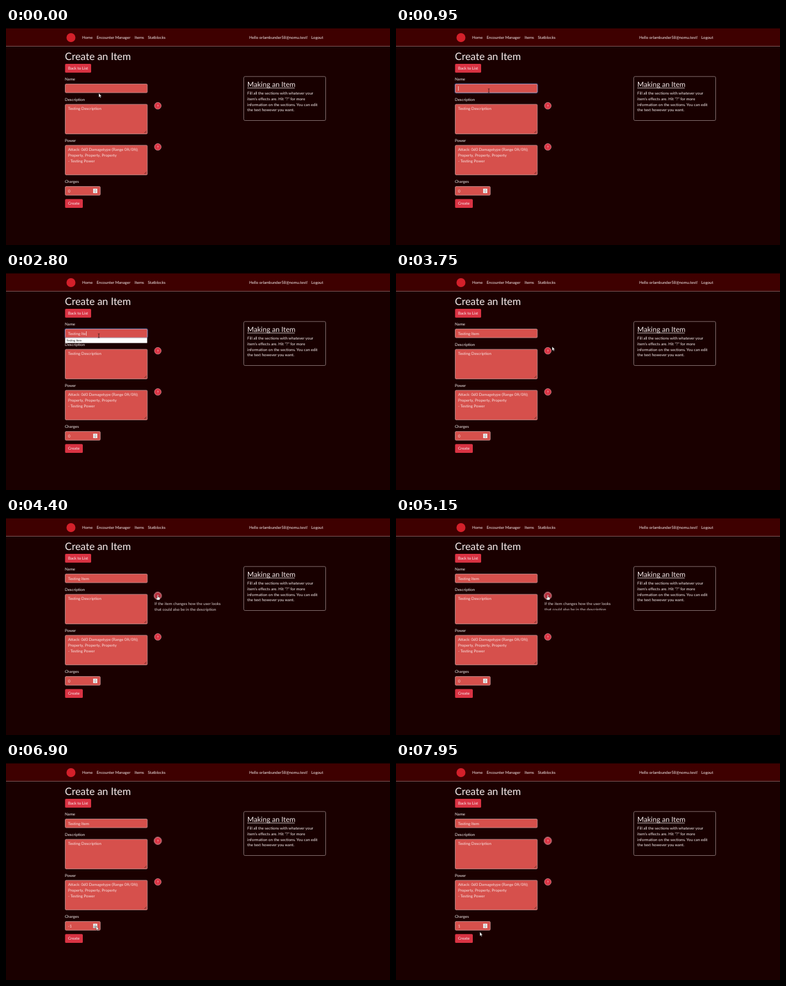
These frames come from a looping animation (600 px wide and 339 px high, 8000 ms). An HTML page:

```html
<!DOCTYPE html>
<html lang="en">
<head>
<meta charset="utf-8">
<title>Create an Item</title>
<style>
  html, body { margin: 0; width: 100%; height: 100%; overflow: hidden; background: #1a0000; }
  svg { display: block; width: 100vw; height: 100vh; }
  text { font: 6.15px Lato, sans-serif; fill: #f6eeee; text-rendering: geometricPrecision; white-space: pre; }
  .h1 { font-size: 16px; }
  .h2 { font-size: 11.1px; }
  .input { fill: #d6504c; stroke: #cda3a4; stroke-width: .7; }
  .value { fill: #f8e2e0; }
  .btn { fill: #da3343; }
  .grip { stroke: #4f2a2a; stroke-width: .7; }
  .help circle { fill: #da3343; stroke: #e3a3a8; stroke-width: .7; }
  .help text { font-size: 5.5px; text-anchor: middle; }
  #popup text { font-size: 4.45px; fill: #1a1a1a; }

  #pointer { animation: move 8s infinite ease-in-out; }
  #nameRing, #helpRing, #helpDot, #drawer { animation-duration: 8s; animation-iteration-count: infinite; }
  @keyframes move {
    0%, .6% { transform: translate(145px, 102px); }
    7.5%, 41.25% { transform: translate(145px, 98px); }
    46.875% { transform: translate(244px, 115px); }
    49.4%, 67.5% { transform: translate(237px, 121px); }
    73.1% { transform: translate(141px, 253px); }
    76.9%, 80% { transform: translate(139px, 250px); }
    82.5%, 88.1% { transform: translate(141px, 255px); }
    90.6%, 96.2% { transform: translate(139.5px, 250px); }
    99.4%, 100% { transform: translate(131px, 264px); }
  }
  #nameRing { animation-name: nameFocus; }
  @keyframes nameFocus {
    0%, 8.7% { opacity: 0; }
    10.6%, 41.25% { opacity: 1; }
    43.1%, 100% { opacity: 0; }
  }
  #helpRing { animation-name: helpFocus; }
  @keyframes helpFocus {
    0%, 51.2% { opacity: 0; }
    53%, 100% { opacity: 1; }
  }
  #helpDot { animation-name: helpHover; }
  @keyframes helpHover {
    0%, 48.1% { fill: #da3343; }
    50%, 67.7% { fill: #b82d3a; }
    69.5%, 100% { fill: #da3343; }
  }
  #drawer { animation-name: drawer; animation-timing-function: ease; }
  @keyframes drawer {
    0%, 51.875% { height: 0; }
    56.25%, 63.375% { height: 24px; }
    67.75%, 100% { height: 0; }
  }
</style>
</head>
<body>
<svg viewBox="0 0 600 339" preserveAspectRatio="none">
  <defs>
    <clipPath id="drawerClip"><rect id="drawer" x="230" y="129" width="125" height="0"/></clipPath>
    <g id="grip" class="grip"><path d="M-4.5 -1L-1 -4.5M-2.6 -1L-1 -2.6"/></g>
  </defs>

  <rect width="600" height="339" fill="#1a0000"/>
  <rect width="600" height="28.5" fill="#3e0000"/>
  <rect width="600" height="1" fill="#150000"/>
  <rect y="28" width="600" height="1" fill="#775252"/>
  <circle cx="101.5" cy="15" r="7" fill="#d3202a"/>
  <text x="119" y="17.3">Home</text>
  <text x="141.5" y="17.3">Encounter Manager</text>
  <text x="201" y="17.3">Items</text>
  <text x="221.5" y="17.3">Statblocks</text>
  <text x="380" y="17.3">Hello orlambunder58@nomu.test!</text>
  <text x="477" y="17.3">Logout</text>

  <text class="h1" x="92" y="49.6">Create an Item</text>
  <rect class="btn" x="92.3" y="56" width="40.7" height="13.8" rx="1.5"/>
  <text x="97" y="65.2">Back to List</text>

  <text x="92" y="82.2">Name</text>
  <text x="92" y="114">Description</text>
  <text x="92" y="178.2">Power</text>
  <text x="92" y="242.2">Charges</text>

  <rect class="input" x="92.5" y="87.5" width="128.3" height="13.6" rx="1.5"/>
  <g id="nameRing" fill="none">
    <rect x="91.5" y="86.5" width="130.3" height="15.6" rx="2.3" stroke="#0d6efd" stroke-opacity=".15" stroke-width="1.4"/>
    <rect x="92.5" y="87.5" width="128.3" height="13.6" rx="1.5" stroke="#a596bd" stroke-width=".7"/>
  </g>
  <text class="value" id="name" x="97" y="96.6"></text>
  <rect id="caret" y="91" width=".6" height="7" fill="#fff"/>

  <rect class="input" x="92.5" y="119.2" width="128.3" height="46.2" rx="1.5"/>
  <text class="value" x="97" y="128.4">Testing Description</text>
  <use href="#grip" x="220.5" y="165"/>

  <rect class="input" x="92.5" y="183.2" width="128.3" height="46.2" rx="1.5"/>
  <text class="value" x="97" y="192.4">Attack: 0d0 Damagetype (Range 0ft/0ft);</text>
  <text class="value" x="97" y="201.2">Property, Property, Property</text>
  <text class="value" x="97" y="210.1">- Testing Power</text>
  <use href="#grip" x="220.5" y="229"/>

  <rect class="input" x="92.5" y="247.6" width="54.8" height="13.6" rx="1.5"/>
  <text class="value" id="charges" x="97" y="256.6">0</text>
  <rect x="136.2" y="251" width="6.4" height="7" fill="#efefef"/>
  <rect id="spinHot" x="136.2" width="6.4" height="3.5" fill="#c4c4c4"/>
  <path d="M138.2 253.6l1.2-1.4 1.2 1.4zM138.2 255.6l1.2 1.4 1.2-1.4z" fill="#666"/>

  <rect class="btn" x="92.3" y="267.2" width="27.7" height="13.8" rx="1.5"/>
  <text x="97" y="276.3">Create</text>

  <g class="help">
    <circle id="helpRing" cx="237.2" cy="121.5" r="6" style="fill:none;stroke:#b8646b;stroke-width:.9"/>
    <circle id="helpDot" cx="237.2" cy="121.5" r="5.2"/>
    <text x="237.2" y="123.5">?</text>
    <circle cx="237.2" cy="185.8" r="5.2"/>
    <text x="237.2" y="187.8">?</text>
  </g>
  <g clip-path="url(#drawerClip)" opacity=".88">
    <text x="232" y="136.2">If the item changes how the user looks</text>
    <text x="232" y="145.1">that could also be in the description</text>
  </g>

  <rect x="371.5" y="75.8" width="128" height="68.7" rx="2" fill="#180000" stroke="#a89696" stroke-width=".7"/>
  <text class="h2" x="377" y="92">Making an Item</text>
  <rect x="377" y="93.5" width="74.2" height=".7" fill="#fff"/>
  <text x="377" y="103.8">Fill all the sections with whatever your</text>
  <text x="377" y="112.7">item's effects are. Hit "?" for more</text>
  <text x="377" y="121.5">information on the sections. You can edit</text>
  <text x="377" y="130.3">the text however you want.</text>

  <g id="popup">
    <rect id="sheet" x="92.5" y="101.4" width="128" fill="#fff" stroke="#b9b9b9" stroke-width=".4"/>
  </g>

  <g id="pointer">
    <path id="arrow" d="M0 0V6.2L1.4 4.9 2.4 7.1 3.4 6.7 2.4 4.5H4.3Z" fill="#fff" stroke="#222" stroke-width=".4"/>
    <path id="beam" d="M-1.3 -3.2Q0 -3.2 0 -2.4Q0 -3.2 1.3 -3.2M0 -2.4V2.4M-1.3 3.2Q0 3.2 0 2.4Q0 3.2 1.3 3.2" fill="none" stroke="#241010" stroke-width=".7"/>
    <path id="hand" d="M-.7 .3Q0 -.6 .7 .3V2.6L3 3.1Q3.7 3.3 3.6 4.2L3 7H-.9L-2.6 4.4Q-2.3 3.4 -.7 4.4Z" fill="#fff" stroke="#222" stroke-width=".4"/>
  </g>
</svg>
<script>
const LOOP = 8000, ROW = 7.4;
const $ = id => document.getElementById(id);
const NAME = 'Testing Item';
const keyTimes = [1250, 1450, 1650, 1800, 1950, 2050, 2250, 2450, 2650, 2700, 2800, 2900];
const charges = [[0, '0'], [6300, '1'], [6700, '0'], [6900, '-1'], [7300, '0'], [7500, '1']];
const shapes = [[0, 'arrow'], [200, 'beam'], [3350, 'arrow'], [3850, 'hand'],
  [5500, 'arrow'], [5600, 'beam'], [5700, 'arrow']];
const hotHalf = [[0, 0], [5850, 251], [6500, 254.5], [7150, 251], [7800, 0]];
const suggestions = ['Testing Item', 'Ring of Testing', 'Test', 'Testing', 'Testing Ring'];

const rows = suggestions.map(label => {
  const row = document.createElementNS('http://www.w3.org/2000/svg', 'text');
  row.textContent = label;
  row.setAttribute('x', 94.5);
  return $('popup').appendChild(row);
});

const latest = (list, t) => list.filter(([start]) => start <= t).pop()[1];
const show = (el, on) => { el.style.display = on ? '' : 'none'; };
const matches = (label, typed) =>
  (' ' + label).toLowerCase().includes(' ' + typed.trim().toLowerCase());

function drawPopup(typed) {
  const open = typed && typed !== NAME;
  show($('popup'), open);
  if (!open) return;
  let n = 0;
  rows.forEach(row => {
    const hit = matches(row.textContent, typed);
    show(row, hit);
    if (hit) row.setAttribute('y', 107.1 + ROW * n++);
  });
  $('sheet').setAttribute('height', ROW * n + .4);
}

function draw(t) {
  const typed = NAME.slice(0, keyTimes.filter(k => k <= t).length);
  $('name').textContent = typed;
  drawPopup(typed);

  show($('caret'), t >= 750 && t < 3300);
  $('caret').setAttribute('x', 97.3 + (typed ? $('name').getComputedTextLength() : 0));

  $('charges').textContent = latest(charges, t);
  const hot = latest(hotHalf, t);
  show($('spinHot'), hot);
  $('spinHot').setAttribute('y', hot);

  const shape = latest(shapes, t);
  for (const id of ['arrow', 'beam', 'hand']) show($(id), id === shape);
}

let start;
function tick(now) {
  start ??= now;
  draw((now - start) % LOOP);
  requestAnimationFrame(tick);
}
draw(0);
requestAnimationFrame(tick);
</script>
</body>
</html>
```
